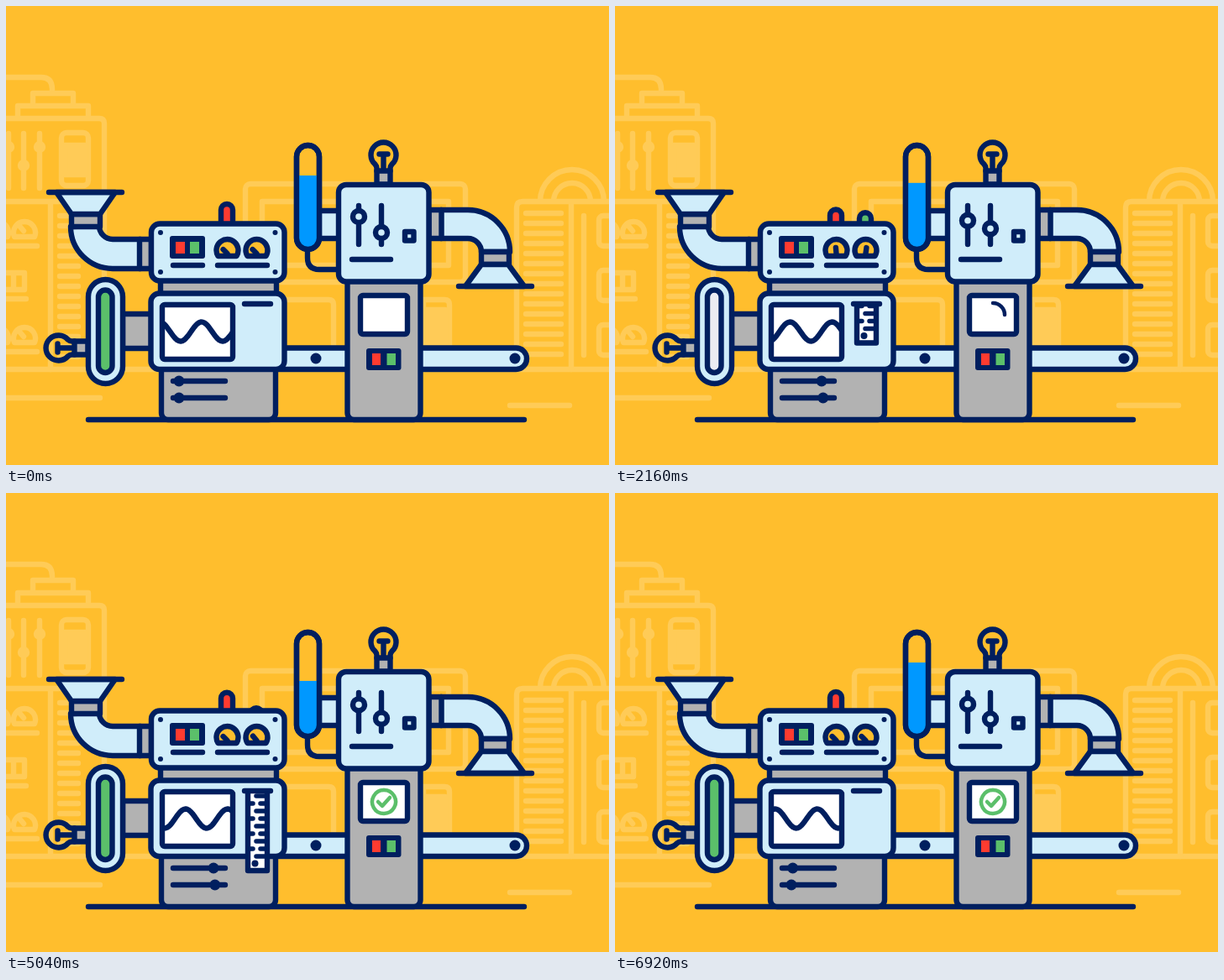
These frames come from a looping animation (718x547 px, 6.96 s). An HTML page:

```html
<!DOCTYPE html>
<html lang="en">
<head>
<meta charset="utf-8">
<title>Machine</title>
<style>
html, body { margin: 0; width: 100%; height: 100%; overflow: hidden; background: #ffbe2d; }
svg { display: block; width: 100vw; height: 100vh; }
.back { fill: none; stroke: #ffcb57; }
.back .solid { fill: #ffcb57; }
.line { fill: none; stroke: #001f5f; }
.line, .back { stroke-width: 6.4; stroke-linecap: round; stroke-linejoin: round; }
.pale { fill: #d0edfa; }
.grey { fill: #b2b2b2; }
.white { fill: #fff; }
.navy { fill: #001f5f; stroke: none; }
.red { fill: #ff3b30; }
.green { fill: #5bbf6a; }
.blue { fill: #0098ff; }
.flat { stroke: none; }
</style>
</head>
<body>
<svg viewBox="0 0 718 547" preserveAspectRatio="none">
<defs>
  <clipPath id="screenClip"><rect x="186" y="356" width="84" height="65"/></clipPath>
  <clipPath id="slotClip"><rect x="270" y="355" width="60" height="110"/></clipPath>
  <clipPath id="tubeClip"><rect x="346" y="166" width="27" height="124" rx="13.5"/></clipPath>
  <clipPath id="barClip"><rect x="110" y="339" width="16" height="98" rx="8"/></clipPath>
  <g id="bulb">
    <path d="M-8 19V16Q-8 13.500-10 11.200A15 15 0 1 1 10 11.200Q8 13.500 8 16V19"/>
    <path d="M-5-1H5M0-1V18"/>
    <rect class="grey" x="-8" y="19" width="16" height="16"/>
  </g>
  <path id="gauge" d="M-11 7A13 13 0 1 1 11 7Z" fill="#ffbe2d"/>
</defs>

<g class="back">
  <path d="M0 85H42Q55 85 55 99V104M32 118V104H80V118M14 133V119H98V133M0 134H111Q117 134 117 140V433"/>
  <path d="M3 152V217M21 152V217M40 152V217"/>
  <g class="solid"><circle cx="3" cy="168" r="4"/><circle cx="21" cy="190" r="4"/><circle cx="40" cy="168" r="4"/></g>
  <rect x="66" y="151" width="32" height="63" rx="6"/><rect class="solid" x="70" y="166" width="24" height="35"/>
  <path d="M0 233H117M53 233V433M0 286H37M0 349H24M0 412H37M0 318H22V338H0M9 318V338"/>
  <path d="M10 275A13 13 0 1 1 34 275ZM10 401A13 13 0 1 1 34 401ZM-22 275A13 13 0 1 1 2 275ZM-22 401A13 13 0 1 1 2 401ZM21 268L16 262M21 394L16 388"/>
  <path id="hatchL"/>
  <path d="M0 433H718M0 467H112M600 476H671"/>
  <rect x="285" y="212" width="262" height="117" rx="6"/><rect x="305" y="233" width="222" height="76"/>
  <path d="M330 405V350H384Q390 350 390 356V405M497 405V350H522Q528 350 528 356V405"/>
  <rect class="solid" x="500" y="362" width="23" height="40"/>
  <path d="M636 233A38 38 0 0 1 712 233M652 233A22 22 0 0 1 696 233M608 433V240Q608 233 615 233H718M673 233V433M688 250V416"/>
  <path id="hatchR"/>
  <rect x="706" y="250" width="30" height="36" rx="5"/><rect x="706" y="315" width="30" height="36" rx="5"/><rect x="706" y="380" width="30" height="36" rx="5"/>
</g>

<g class="line">
  <path d="M98 493H617"/>
  <rect class="pale" x="310" y="407.500" width="310" height="25.500" rx="12.500"/>
  <circle class="navy" cx="369" cy="420" r="6.500"/><circle class="navy" cx="606" cy="420" r="6.500"/>

  <g id="drops">
    <circle class="blue" r="11"/>
    <rect class="green" x="-10" y="-10" width="20" height="20"/>
    <path class="red" d="M0-12L12 10H-12Z"/>
  </g>
  <g id="box">
    <rect class="navy" x="-25" y="-25" width="50" height="50" rx="4"/>
    <rect class="blue flat" x="-18" y="-21" width="36" height="6.500"/>
    <path class="green flat" d="M-17.500-11h8.500V18h-8.500ZM-4.250-11h8.500V18h-8.500ZM9-11h8.500V18h-8.500Z"/>
  </g>

  <!-- intake -->
  <path class="pale" d="M77 263A50 50 0 0 0 127 313H160V278H127A16 16 0 0 1 111 262Z"/>
  <rect class="grey" x="159" y="278" width="14" height="35"/>
  <rect class="grey" x="78" y="248" width="34" height="15"/>
  <path class="pale" d="M60 222H130L112 248H78Z"/>
  <path id="lip" d="M51 222H138"/>

  <!-- left bar and bulb -->
  <rect class="grey" x="139" y="367" width="34" height="41"/>
  <use id="bulbL" href="#bulb" transform="translate(62.5 407.5) rotate(-90)"/>
  <rect class="pale" x="98" y="326" width="41" height="124" rx="20.500"/>
  <g clip-path="url(#barClip)" class="flat">
    <rect x="110" y="338" width="17" height="100" fill="#ececf2"/>
    <rect id="bar" class="green" x="110" width="17" height="100"/>
  </g>
  <rect x="110" y="338.500" width="16.500" height="98.500" rx="8.250"/>

  <!-- left machine -->
  <path id="lampR" class="red"/><path id="lampG" class="green"/>
  <rect class="grey" x="184" y="320" width="138" height="30"/>
  <rect class="grey" x="185" y="425" width="136" height="68" rx="8"/>
  <rect class="pale" x="173" y="259.500" width="158.500" height="68" rx="10"/>
  <rect class="pale" x="172.500" y="342.500" width="159" height="90.500" rx="10"/>
  <g class="navy"><circle cx="184" cy="270" r="3"/><circle cx="320.500" cy="270" r="3"/><circle cx="184" cy="317" r="3"/><circle cx="320.500" cy="317" r="3"/>
    <rect x="195" y="274" width="42" height="27" rx="3"/></g>
  <path class="red flat" d="M202 281h11v14h-11Z"/><path class="green flat" d="M219 281h11v14h-11Z"/>
  <path d="M199 309H234M252 309H311"/>
  <use href="#gauge" x="263.500" y="291"/><use href="#gauge" x="298.500" y="291"/>
  <path id="needle1" d="M0 0V-7"/><path id="needle2" d="M0 0V-7"/>
  <g clip-path="url(#screenClip)">
    <rect class="white flat" x="186" y="356" width="84" height="65"/><path id="wave"/>
  </g>
  <rect x="186" y="356" width="84" height="65" rx="3"/>
  <path d="M199 447H261M199 467H261"/>
  <circle id="knob1" class="navy" cy="447" r="6.500"/><circle id="knob2" class="navy" cy="467" r="6.500"/>
  <g clip-path="url(#slotClip)"><g id="strip">
    <rect class="white" x="288" y="-110" width="23" height="110"/>
    <path id="ticks" stroke-width="5.500"/><circle class="navy" cx="296.500" cy="-8.500" r="4"/>
  </g></g>
  <path d="M284 355H315"/>

  <!-- tube -->
  <rect class="pale" x="370" y="244" width="27" height="33"/>
  <path d="M359 290V300Q359 314 373 314H397"/>
  <rect x="346" y="166" width="27" height="124" rx="13.500" fill="#ffbe2d"/>
  <g clip-path="url(#tubeClip)"><rect id="liquid" class="blue flat" x="346" width="27" height="100"/></g>
  <rect x="346" y="166" width="27" height="124" rx="13.500"/>

  <!-- outlet -->
  <path class="pale" d="M518 243H550A50 50 0 0 1 600 293H566A16 16 0 0 0 550 277H518Z"/>
  <rect class="grey" x="503.500" y="243" width="15" height="34"/>
  <rect class="grey" x="566" y="293" width="33" height="15"/>
  <path class="pale" d="M566 308H598L617 334H547Z"/>
  <path d="M539 334H626"/>

  <!-- right machine -->
  <use id="bulbT" href="#bulb" transform="translate(449.5 177.5)"/>
  <rect class="grey" x="406.500" y="320" width="87" height="173" rx="8"/>
  <rect class="pale" x="396" y="213" width="107.500" height="115.500" rx="9"/>
  <path d="M420 238V284M447 238V284M412 302H458"/>
  <g class="pale"><circle id="knobA" cx="420" r="7"/><circle id="knobB" cx="447" r="7"/><rect x="475" y="269" width="10.500" height="10.500"/></g>
  <rect class="white" x="422" y="345" width="56" height="46" rx="3"/>
  <path id="ring" style="stroke-width:4.500;stroke-linecap:round"/>
  <path id="check" d="M443 368L448 373L457 363" stroke-dasharray="22" style="stroke:#5bbf6a;stroke-width:4.500"/>
  <rect class="navy" x="429" y="408" width="41.500" height="26" rx="3"/>
  <path class="red flat" d="M436 414h10v14h-10Z"/><path class="green flat" d="M453.500 414h10.500v14h-10.500Z"/>
  <path id="raysL"/><path id="raysT"/>
</g>
</svg>
<script>
const LOOP = 6960;
const $ = id => document.getElementById(id);
const set = (id, name, value) => $(id).setAttribute(name, value);

// Linear interpolation through [position, value] pairs.
function at(keys, t) {
  if (t <= keys[0][0]) return keys[0][1];
  for (let i = 1; i < keys.length; i++) {
    const [a, u] = keys[i - 1], [b, v] = keys[i];
    if (t <= b) return u + (v - u) * (t - a) / (b - a);
  }
  return keys[keys.length - 1][1];
}

// Values at the main beats of the loop.
const beats = [0, 1480, 2840, 4120, 5040, 5680, 6920, LOOP];
const track = values => beats.map((t, i) => [t, values[i]]);
const waveTurns = track([0, 4.44, 8.54, 12.15, 14.38, 16.68, 19.84, 20]);
const knobTurns1 = track([0, 4.38, 8.42, 12.19, 14.58, 16.25, 19.88, 20]);
const knobTurns2 = track([0, 4.4, 8.45, 12.27, 14.55, 16.1, 19.9, 20]);
const needleAngles1 = track([-45, -10, 0, 30, -45, -35, -45, -45]);
const needleAngles2 = track([-45, -20, 35, 0, -40, -25, -45, -45]);

const redLevel = [[0, 1], [.07, .93], [.14, .87], [.3, .3], [.4, 0], [.6, 0], [.71, .38], [.86, .88], [1, 1]];
const greenLevel = [[0, 0], [.07, .22], [.14, .5], [.3, 1], [.5, 1], [.71, .22], [.8, 0], [1, 0]];
const liquidTop = [[1950, 202], [4080, 291], [4200, 291], [5040, 224], [5290, 202]];
const barTop = [[480, 338], [1420, 438], [2700, 438], [2840, 424], [3640, 338]];
const stripEnd = [[700, 348], [1480, 390], [2840, 413], [4120, 440], [4500, 450], [5080, 450], [5500, 348]];
const ringAngle = [[1480, 0], [2840, 180], [4120, 305], [4360, 359.9]];
const boxX = [[5250, 582], [5500, 620], [5680, 657.500], [5770, 669], [6900, 746]];
const boxTurn = [[5440, 0], [5680, 70], [5770, 90]];

function boxY(t) {
  if (t < 5250) return 305 + 75 * ((t - 5080) / 170) ** 2;
  if (t < 5460) return 380;
  if (t < 5770) return 380 + 91 * ((t - 5460) / 310) ** 1.04;
  if (t < 5970) return 471 - 8 * Math.sin((t - 5770) / 200 * Math.PI);
  return 471;
}

function rays(id, x, y, from, to, age) {
  let d = '';
  if (age >= 0 && age < 360) {
    const outer = Math.min(45, 30 + age * .05);
    const inner = outer - Math.min(6, (360 - age) / 12);
    for (let a = from; a <= to; a += 45) {
      const c = Math.cos(a * Math.PI / 180), s = Math.sin(a * Math.PI / 180);
      d += `M${x + c * inner} ${y + s * inner}L${x + c * outer} ${y + s * outer}`;
    }
  }
  set(id, 'd', d);
  return d ? '#d0edfa' : 'none';
}

function lamp(id, x, level) {
  const top = 262 - 26 * level;
  set(id, 'd', `M${x - 7} 268V${top + 7}A7 7 0 0 1 ${x + 7} ${top + 7}V268Z`);
}

const hatch = (x1, x2, y) => Array.from({ length: 15 }, (_, i) => `M${x1} ${y + i * 12}H${x2}`).join('');
set('hatchL', 'd', hatch(64, 86, 250));
set('hatchR', 'd', hatch(619, 661, 247));
set('ticks', 'd', Array.from({ length: 10 }, (_, i) =>
  `M${i % 2 ? 303 : 298} ${-17 - i * 9}H311` + (i % 2 ? `M288 ${-17 - i * 9}h6` : '')).join(''));

const drops = [...$('drops').children];

function draw(t) {
  drops.forEach((el, i) => {
    const k = (t - 20 - i * 150) / 440;
    el.style.display = k > 0 && k < 1 ? '' : 'none';
    el.setAttribute('transform', `translate(${95 + [0, -9, 8][i]} ${-14 + 265 * k * k}) rotate(${k * 90 * (i - 1)}) scale(${k > .93 ? .7 : 1})`);
  });
  const wobble = t > 420 && t < 900 ? Math.sin((t - 420) / 40) * (900 - t) / 480 : 0;
  set('lip', 'transform', `translate(0 ${wobble})`);

  const boxOn = t > 5080 && t < 6900;
  $('box').style.display = boxOn ? '' : 'none';
  const size = Math.min(1, .4 + Math.max(0, t - 5080) / 230);
  if (boxOn) set('box', 'transform', `translate(${at(boxX, t)} ${boxY(t)}) rotate(${at(boxTurn, t)}) scale(${size})`);

  const beat = t * 7 / LOOP % 1, red = at(redLevel, beat);
  lamp('lampR', 263, red);
  lamp('lampG', 298, at(greenLevel, beat));
  set('knobA', 'cy', 270 - 19 * red);
  set('knobB', 'cy', 251 + 19 * red);

  const swing = turns => 228 - 22 * Math.cos(at(turns, t) * 2 * Math.PI);
  set('knob1', 'cx', swing(knobTurns1));
  set('knob2', 'cx', swing(knobTurns2));
  set('needle1', 'transform', `translate(263.5 295) rotate(${at(needleAngles1, t)})`);
  set('needle2', 'transform', `translate(298.5 295) rotate(${at(needleAngles2, t)})`);

  const peak = 233 - 50 * at(waveTurns, t);
  let d = '';
  for (let x = 180; x <= 276; x += 2)
    d += `${d ? 'L' : 'M'}${x} ${388 - 11.5 * Math.cos((x - peak) / 50 * 2 * Math.PI)}`;
  set('wave', 'd', d);

  set('bar', 'y', at(barTop, t));
  set('liquid', 'y', at(liquidTop, t));
  const end = at(stripEnd, t);
  set('strip', 'transform', `translate(0 ${end})`);
  $('strip').style.display = end > 349 ? '' : 'none';

  const angle = at(ringAngle, t), a = angle * Math.PI / 180;
  set('ring', 'd', angle ? `M450 354A14 14 0 ${angle > 180 ? 1 : 0} 1 ${450 + 14 * Math.sin(a)} ${368 - 14 * Math.cos(a)}` : '');
  const g = at([[3640, 0], [4000, 1]], t);
  $('ring').style.stroke = `rgb(${91 * g},${31 + 160 * g},${95 + 11 * g})`;
  set('check', 'stroke-dashoffset', at([[4360, 22], [4700, 0]], t));
  $('check').style.display = t > 4360 ? '' : 'none';

  $('bulbL').style.fill = rays('raysL', 61.5, 407, 90, 270, t < 3000 ? t - 1420 : t - 3660);
  $('bulbT').style.fill = rays('raysT', 449.5, 175, 180, 360, t - 4450);
}

function tick() {
  draw(performance.now() % LOOP);
  requestAnimationFrame(tick);
}
tick();
</script>
</body>
</html>
```
